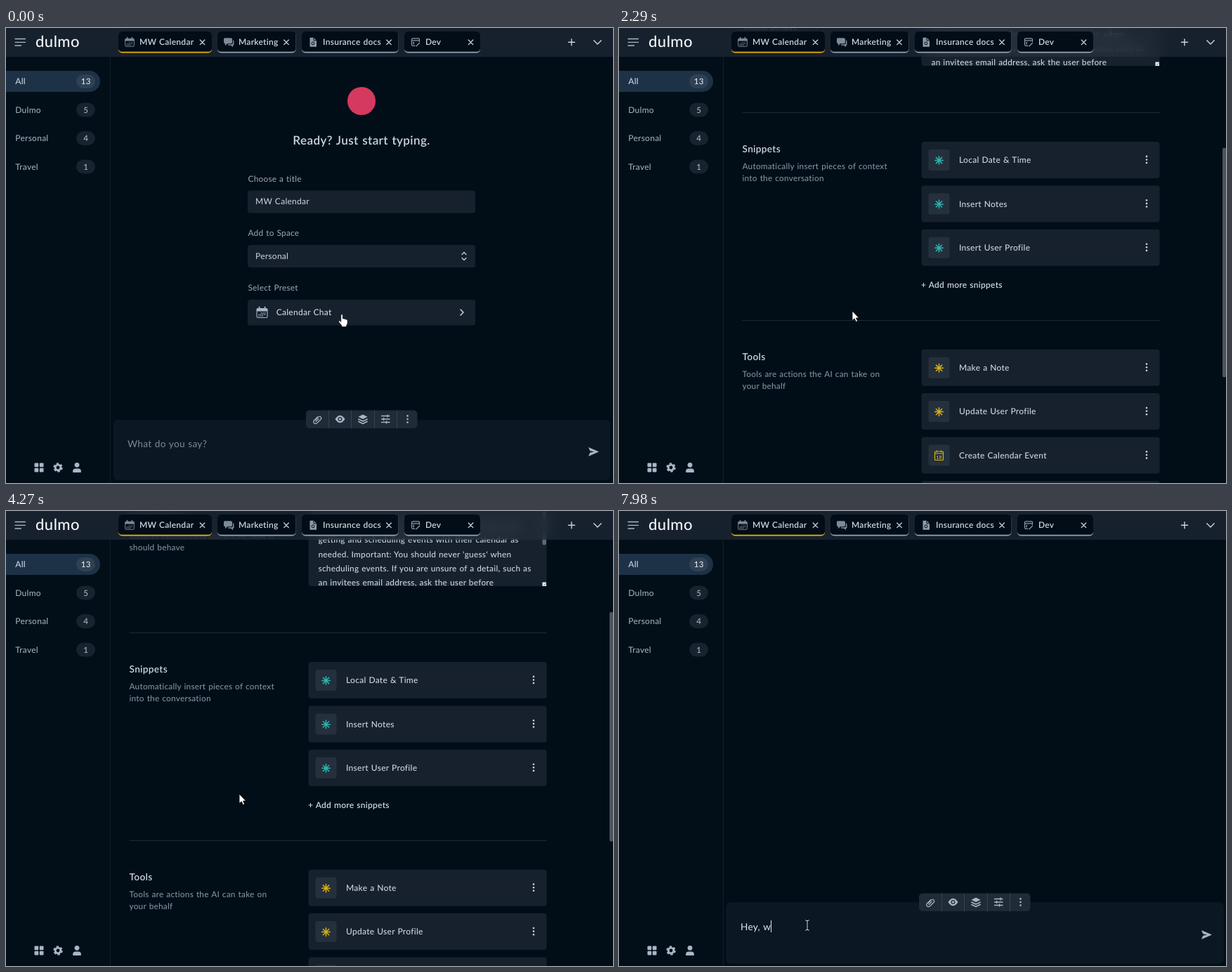
An HTML page that plays this animation: 864 px wide and 648 px high, repeating every 8000 ms.

```html
<!DOCTYPE html>
<html lang="en">
<head>
<meta charset="utf-8">
<title>Chat stack</title>
<style>
html, body { margin: 0; width: 100%; height: 100%; overflow: hidden; background: #010e18; }
svg, #bar { position: absolute; left: 0; top: 0; }
#bar { width: 864px; height: 41px; background: rgba(36, 45, 58, .66); backdrop-filter: blur(10px); }
text { font: 400 12px Lato, "Open Sans", sans-serif; letter-spacing: .022em; word-spacing: .05em;
  text-rendering: geometricPrecision; white-space: pre; fill: #cbd5e1; }
.desc { font-size: 11.8px; fill: #8b98a8; }
.label { font-size: 11.8px; fill: #9ba8b7; }
.med { font-weight: 500; }
.bold { font-weight: 600; }
.head { font-size: 13.7px; font-weight: 600; }
.big { font-size: 17.1px; font-weight: 600; }
.entry { font-size: 13.6px; }
.mid { text-anchor: middle; }
.line { fill: none; stroke-linecap: round; stroke-linejoin: round; }
</style>
</head>
<body>
<svg id="main" width="864" height="648"></svg>
<div id="bar"></div>
<svg id="top" width="864" height="648"></svg>
<script>
const $ = id => document.getElementById(id);
const SLATE = '#a9b6c6', CARD = '#17212d', TEAL = '#2db5b0', GOLD = '#d9b116';

const text = (x, y, s, cls = '', attr = '') => `<text x="${x}" y="${y}" class="${cls}" ${attr}>${s}</text>`;
const rect = (x, y, w, h, fill, r = 0, attr = '') =>
  `<rect x="${x}" y="${y}" width="${w}" height="${h}" rx="${r}" fill="${fill}" ${attr}/>`;
const line = (d, color = SLATE, w = 1.5, attr = '') =>
  `<path class="line" d="${d}" stroke="${color}" stroke-width="${w}" ${attr}/>`;
const shape = (d, fill = SLATE, attr = '') => `<path d="${d}" fill="${fill}" ${attr}/>`;
const dot = (x, y, r, fill = SLATE) => `<circle cx="${x}" cy="${y}" r="${r}" fill="${fill}"/>`;
const ring = (x, y, r, w, color = SLATE, attr = '') =>
  `<circle cx="${x}" cy="${y}" r="${r}" fill="none" stroke="${color}" stroke-width="${w}" ${attr}/>`;
const group = (x, y, s, attr = '') => `<g transform="translate(${x} ${y})" ${attr}>${s}</g>`;

const dots = (x, y, color = '#cbd5e1', gap = 4.6) => [-gap, 0, gap].map(d => dot(x, y + d, 1.3, color)).join('');
const close = x => line(`M${x - 3.3} 17l6.600 6.600m0 -6.600l-6.600 6.600`, '#cbd5e1', 1.3);
const right = (x, y) => line(`M${x - 2} ${y - 4}l4 4l-4 4`, '#cbd5e1', 1.5);

// Centred on its own origin, 16 px wide
const calendar = color => rect(-7.5, -6, 15, 13, 'none', 1.5, `stroke="${color}" stroke-width="1.1"`) +
  rect(-7.5, -6, 15, 4, color, 1) + line('M-4 -8V-5.500M4 -8V-5.500', color, 1.8) +
  line('M-1.500 .500H5.500M-5 2.700H5.500M-5 4.900H2', color, 1.4, 'stroke-dasharray="1.300 1.200" style="stroke-linecap:butt"');
const star = color => [0, 45, 90, 135].map(a => line('M0 -5.800V5.800', color, 1.5, `transform="rotate(${a})"`)).join('');
const dateIcon = rect(-6, -6, 12, 12.5, 'none', 1, `stroke="${GOLD}" stroke-width="1.2"`) +
  line('M-6 -3H6M-3 -6.800V-5M3 -6.800V-5', GOLD, 1.2) +
  text(0, 4.8, '18', 'mid bold', `style="font-size:7px;fill:${GOLD}"`);

function homeView() {
  const field = (y, h) => rect(344, y, 324, h, CARD, 4);
  return `<g id="home">` + `<g id="form">` +
    dot(506, 104, 20, '#d6395f') +
    text(506, 166, 'Ready? Just start typing.', 'big mid') +
    text(344.5, 218.5, 'Choose a title', 'label') + field(231.5, 32) + text(355, 251.3, 'MW Calendar') +
    text(344.5, 296, 'Add to Space', 'label') + field(309, 32) + text(355, 329, 'Personal') +
    line('M649 322.500l3 -3l3 3M649 327.500l3 3l3 -3', '#cbd5e1', 1.2) +
    text(344.5, 373.5, 'Select Preset', 'label') + field(387, 36.5) +
    group(364.5, 405.5, calendar(SLATE)) + text(384.7, 409.3, 'Calendar Chat', 'med') + right(649, 405) + `</g>` +
    rect(153, 558, 707, 86, '#0b1722', 6, 'id="panel"') +
    text(173, 596.5, '', 'entry', 'id="entry"') + rect(173, 583, 1, 17, '#e2e8f0', 0, 'id="caret"') +
    shape('M829 597l15 6.500l-15 6.500l2.300 -5.300l6 -1.200l-6 -1.200Z') +
    rect(427, 544.5, 158.5, 25.5, '#1f2b37', 5) +
    line('M459.500 545V570M491.500 545V570M524.500 545V570M556.500 545V570', '#344250', 1) +
    line('M440 558.500l4.500 -4.500q2 -1.500 3.500 0q1.500 1.700 0 3.500l-5.500 5.300q-2 1.500 -4 0q-1.600 -2 0 -4l5 -5M441 560.500l4 -4', SLATE, 1.2) +
    shape('M468.500 557Q475.500 546.500 482.500 557Q475.500 567.500 468.500 557Z') + dot(475.5, 557, 3, '#1f2b37') + dot(475.5, 557, 1.7) +
    shape('M508 550.500l6.500 3.200l-6.500 3.200l-6.500 -3.200Z') +
    line('M502 557.200l6 2.900l6 -2.900M502 560.500l6 2.900l6 -2.900', SLATE, 1.7) +
    line('M534.500 552.500H546M534.500 557H546M534.500 561.500H546M543 551V554M537.500 555.500V558.500M541.500 560V563', SLATE, 1.3) +
    dots(571.5, 557, SLATE) + `</g>`;
}

function stackView() {
  const section = (y, title, ...lines) => text(175.5, y + 4.8, title, 'head') +
    lines.map((s, i) => text(175.5, y + 29.2 + i * 16.9, s, 'desc')).join('');
  const rule = y => line(`M176 ${y}H769.500`, '#1e2a36', 1);
  const card = (y, s, icon) => rect(430.5, y, 339, 52, CARD, 4) + rect(440.5, y + 11, 30, 30, '#24303c', 3) +
    group(455.5, y + 26.5, icon) + text(484, y + 30.2, s, 'med') + dots(751, y + 25.5);
  const cards = (y, icons, names) => names.map((s, i) => card(y + i * 62.4, s, icons[i])).join('');
  const teal = star(TEAL), gold = star(GOLD);
  const brief = ['Your job is to act as a personal assistant for the user,', 'getting and scheduling events with their calendar as',
    "needed. Important: You should never 'guess' when", 'scheduling events. If you are unsure of a detail, such as',
    'an invitees email address, ask the user before'];
  return `<clipPath id="box"><rect x="430" y="285" width="340" height="107"/></clipPath>` +
    `<g id="stack"><g id="page">` +
    `<circle id="back" cx="187.3" cy="86" r="11.8"/>` + line('M192.500 86H182M186.500 81.500l-4.500 4.500l4.500 4.500', '#0d1a25', 1.6) +
    text(212.8, 93.5, 'Chat Stack', 'big', 'style="font-size:17.4px;fill:#e2e8f0"') +
    section(152.3, 'Preset', 'Start your stack with a ready-made', 'conversation recipe') +
    rect(430.5, 142, 339, 36.5, CARD, 4) + group(450.7, 160.5, calendar(SLATE)) +
    text(470.7, 164.3, 'Calendar Chat', 'med') + right(751, 160.3) + rule(243.5) +
    section(295, 'Instructions', 'Custom instructions tell the AI how it', 'should behave') +
    rect(430.5, 285, 339, 107, CARD, 4) +
    `<g clip-path="url(#box)">` + brief.map((s, i) => text(444.5, 310 + i * 20.28, s, 'med', 'style="font-size:11.8px"')).join('') + `</g>` +
    rect(763.5, 285.5, 5.5, 48, '#5f6873', 2.7) + rect(763.5, 386.5, 5.5, 5.5, '#f1f5f9') +
    line('M765.500 391l3 -3', '#3a434d', .9) + rule(458.5) +
    section(510, 'Snippets', 'Automatically insert pieces of context', 'into the conversation') +
    cards(500, [teal, teal, teal], ['Local Date &amp; Time', 'Insert Notes', 'Insert User Profile']) +
    text(430, 708, '+ Add more snippets', 'bold') + rule(754.5) +
    section(806, 'Tools', 'Tools are actions the AI can take on', 'your behalf') +
    cards(795.7, [gold, gold, dateIcon, dateIcon], ['Make a Note', 'Update User Profile', 'Create Calendar Event', 'Get Calendar Events']) +
    text(430, 1066, '+ Add more tools', 'bold') + rule(1113) +
    section(1164, 'Save Settings', 'Save your stack as a preset for easy', 'reuse') +
    rect(430.3, 1154, 110.5, 30, '#8fa5bd', 4) + text(485.5, 1173.3, 'Save New Preset', 'mid med', 'style="fill:#14212d"') +
    rect(551.5, 1154.5, 141.5, 30.5, 'none', 4, 'stroke="#cbd5e1"') + text(622.5, 1174, 'Update Current Preset', 'mid med') +
    `</g>` + rect(859, 0, 5, 327, '#4a5560', 2.5, 'id="thumb"') + `</g>`;
}

function chrome() {
  const tab = (x, w, s, edge, icon) => rect(x, 5, w, 30.5, edge, 5) + rect(x, 5, w, 28.7, '#020d17', 4.5) +
    group(x + 16, 20.3, icon) + text(x + 30, 24.4, s, 'bold') + close(x + w - 13.5);
  const space = (y, s, n, on) => (on ? shape(`M0 ${y - 15}H119a15 15 0 0 1 0 30H0Z`, '#1d3246') : '') +
    rect(100, y - 10, 27, 20, on ? '#2f4152' : '#17232e', 10) +
    text(13.3, y + 4.2, s, on ? 'med' : '', on ? '' : 'style="fill:#aab6c4"') +
    text(113.8, y + 4, n, 'mid med', `style="font-size:11.5px;fill:${on ? '#e2e8f0' : '#aab6c4'}"`);
  const chat = shape('M-6 -6H3Q5 -6 5 -4V0Q5 2 3 2H-2L-5 5V2Q-7 2 -7 0V-4Q-7 -6 -6 -6Z', '#7d8a99') +
    shape('M6 -3Q7.500 -3 7.500 -1V3Q7.500 4.500 6 4.500V7L3 4.500H-1V3H4Q6 3 6 1Z', '#7d8a99');
  const file = shape('M-4.500 -6.500H1L5 -2.500V6.500H-4.500Z', '#8d9aaa') + line('M1 -6V-2.500H4.500', '#020d17', 1) +
    ring(0, 1.5, 2, 1, '#020d17');
  const code = line('M-1 5H-4Q-5.500 5 -5.500 3.500V-4Q-5.500 -5.500 -4 -5.500H4Q5.500 -5.500 5.500 -4V-1M-5 -2.500H5', '#8d9aaa', 1.2) +
    line('M-2.500 0L-3.500 1.300L-2.500 2.500M1 5.500L5.500 1', '#8d9aaa', 1.3);
  const beam = 'M-2.500 -7H-1L0 -6L1 -7H2.500M0 -6V6M-2.500 7H-1L0 6L1 7H2.500';
  return rect(0, 41, 148, 607, '#020f19') + line('M148.500 41V648', '#111e29', 1) +
    line('M13 15.500H27.500M13 20.300H27.500M13 25H21.500', SLATE, 1.3) +
    text(42, 27, 'dulmo', 'med', 'style="font-size:22px;fill:#f1f5f9"') +
    tab(160, 133, 'MW Calendar', '#eab308', `<g transform="scale(.85)">${calendar('#7d8a99')}</g>`) +
    tab(301, 111.5, 'Marketing', '#94a3b8', chat) + tab(421, 137.5, 'Insurance docs', '#94a3b8', file) +
    tab(567, 108, 'Dev', '#94a3b8', code) +
    line('M800.500 20.300H809.500M805 15.800V24.800M836.800 17.800l5.200 5.200l5.200 -5.200', '#cbd5e1', 1.4) +
    space(76, 'All', 13, true) + space(116.5, 'Dulmo', 5) + space(157, 'Personal', 4) + space(197.5, 'Travel', 1) +
    [40.5, 47.8].map(x => [619.5, 626.8].map(y => rect(x, y, 5.7, 5.7, SLATE, 1)).join('')).join('') +
    ring(74, 626, 3.8, 2.8) + ring(74, 626, 5.7, 2, SLATE, 'stroke-dasharray="3.300 2.669"') +
    dot(101, 622.3, 3.4) + shape('M95.200 633V630.500Q95.500 627.500 99 627.500H103Q106.500 627.500 106.800 630.500V633Z') +
    `<g id="cursor" stroke-linejoin="round">` +
    shape('M0 -.500V13L3.200 10.300L5.300 15L7.600 14L5.500 9.500H9.500Z', '#fff', 'id="arrow" stroke="#000" stroke-width=".8"') +
    shape('M-1.300 1.600Q0 -.300 1.400 1.600V7Q3 6.200 3.900 7.400Q5.300 6.700 6 8Q8.200 7.700 8.200 10V13Q7.900 15 6.700 16.500V18.600H-.200V16.800Q-2.500 14 -4.600 11.200Q-5 9.300 -3 9.800L-1.300 11.400Z',
      '#fff', 'id="hand" stroke="#000" stroke-width=".7"') +
    `<g id="beam">` + line(beam, '#000', 2.4) + line(beam, '#e2e8f0', 1) + `</g></g>`;
}

// Screen updates hold until the next one: [time, value, ...]
const scroll = [[0, 0], [1550, 38], [1680, 132], [1800, 232], [1920, 302], [2040, 338], [2430, 392], [2550, 500], [2670, 590],
  [2790, 636], [3910, 542], [4030, 425], [4150, 330], [4270, 285], [4530, 190], [4650, 70], [4780, 0]];
const fade = [[0, 0], [290, .5], [420, 1], [5880, .5], [6000, 0]];
const pointer = [[0, 478, 407, 'hand'], [80, 477, 407, 'arrow'], [790, 419, 407, 'arrow'], [930, 332, 403.5, 'arrow'],
  [5150, 312, 345, 'arrow'], [5270, 262, 225, 'arrow'], [5390, 218, 130, 'arrow'], [5510, 192, 92, 'hand'], [5630, 187, 84, 'hand'],
  [6120, 192, 150, 'arrow'], [6250, 212, 310, 'arrow'], [6370, 238, 470, 'arrow'], [6500, 255, 575, 'beam'], [6620, 261, 587, 'beam'],
  [6740, 268, 590, 'beam']];
const typed = [[0, ''], [7360, 'H'], [7610, 'Hey'], [7860, 'Hey,'], [7980, 'Hey, w']];
const at = (steps, t) => steps.findLast(s => s[0] <= t).slice(1);
const show = (id, on) => $(id).setAttribute('visibility', on ? 'visible' : 'hidden');

$('main').innerHTML = homeView() + stackView();
$('top').innerHTML = chrome();

function draw(t) {
  const [y] = at(scroll, t), [open] = at(fade, t), [px, py, kind] = at(pointer, t), [words] = at(typed, t);
  $('home').setAttribute('opacity', 1 - open);
  $('stack').setAttribute('opacity', open);
  $('page').setAttribute('transform', `translate(0 ${-y})`);
  $('thumb').setAttribute('y', y * .5045);
  $('back').setAttribute('fill', t >= 5510 ? '#64748b' : '#4b5a69');

  const focus = t >= 6620;
  $('panel').setAttribute('stroke', focus ? '#0f1c28' : 'none');
  $('form').setAttribute('opacity', words ? 0 : 1);
  const entry = $('entry');
  entry.textContent = words || 'What do you say?';
  entry.style.fill = words ? '#e2e8f0' : '#7d8997';
  $('caret').setAttribute('x', 173 + (words ? Math.round(entry.getComputedTextLength()) : 0));
  $('caret').setAttribute('opacity', focus && (t < 7110 || words) ? 1 : 0);

  $('cursor').setAttribute('transform', `translate(${px} ${py})`);
  ['arrow', 'hand', 'beam'].forEach(k => show(k, k === kind));
}

const start = performance.now();
function tick() {
  draw((performance.now() - start) % 8000);
  requestAnimationFrame(tick);
}
tick();
</script>
</body>
</html>
```
